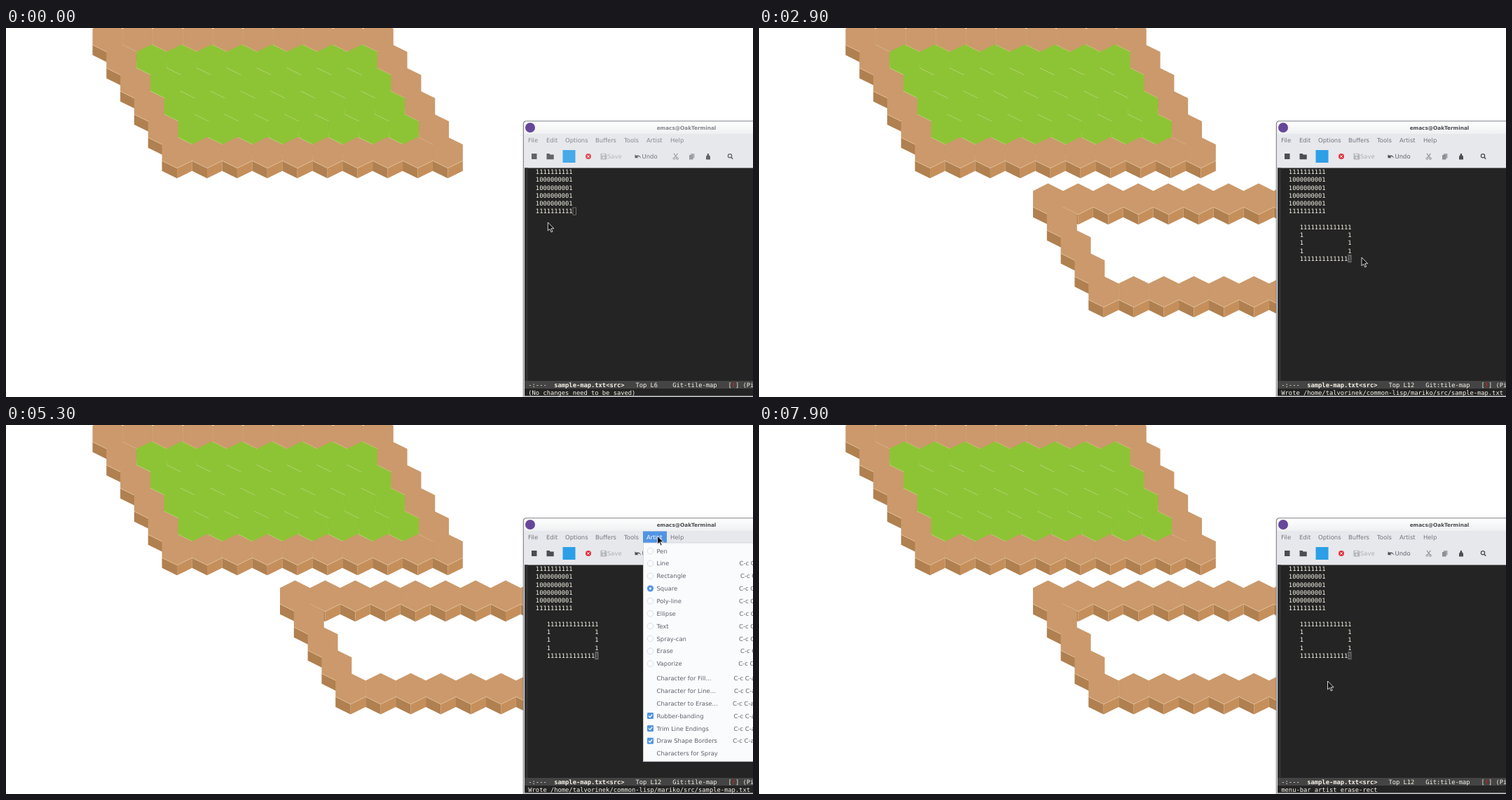
An HTML page that plays this animation: 1066x526 px, repeating every 8000 ms.

```html
<!DOCTYPE html>
<html lang="en">
<head>
<meta charset="utf-8">
<title>Tile map editing</title>
<style>
  html, body { margin: 0; width: 100%; height: 100%; overflow: hidden; background: #fff; }
  svg { display: block; width: 100vw; height: 100vh; }
  text { white-space: pre; text-rendering: geometricPrecision; }
  .ui { font: 8.45px "DejaVu Sans", sans-serif; fill: #5c616c; }
  .mono { font: 8.77px "DejaVu Sans Mono", monospace; fill: #f6f3e8; }
  .bold { font-weight: bold; }
  .title { font: bold 7.3px "DejaVu Sans", sans-serif; text-anchor: middle; }
</style>
</head>
<body>
<svg id="stage" viewBox="0 0 1066 526" preserveAspectRatio="none">
  <defs>
    <linearGradient id="bar" x2="0" y2="1">
      <stop stop-color="#fefefe"/><stop offset="1" stop-color="#eff0f2"/>
    </linearGradient>
  </defs>
  <g id="land"></g>
  <g id="newLand"></g>
  <g id="frame"></g>
  <g id="tools"></g>
  <g id="editor"></g>
  <g id="menu"></g>
  <path id="pointer" d="M0 0V12L2.8 9.4L4.8 14L6.7 13.2L4.7 8.8H8.6Z" fill="#111" stroke="#fff" stroke-width=".8"/>
</svg>
<script>
const LOOP = 8000, STEP = 100;
const CHAR = 5.28, LINE = 11.25, TEXT_X = 745.3;
const BLUE = '#5294e2', INK = '#4b4d52', FADED = '#b4b6bb';

const $ = id => document.getElementById(id);
const put = (id, html) => { if ($(id).lastHtml !== html) $(id).innerHTML = $(id).lastHtml = html; };
const esc = s => s.replace(/&/g, '&amp;').replace(/</g, '&lt;');
const rect = (x, y, w, h, fill, more = '') =>
  `<rect x="${x}" y="${y}" width="${w}" height="${h}" fill="${fill}" ${more}/>`;
const circle = (x, y, r, more) => `<circle cx="${x}" cy="${y}" r="${r}" ${more}/>`;
const path = (d, more) => `<path d="${d}" ${more}/>`;
const label = (x, y, s, cls = 'ui', more = '') =>
  `<text x="${x}" y="${y}" class="${cls}" ${more}>${esc(s)}</text>`;
const mono = (col, y, s, cls = '', more = '') => label(TEXT_X + col * CHAR, y, s, 'mono ' + cls, more);

// Map rows, as typed into the buffer
const ring = (w, h, fill) => Array.from({ length: h }, (_, r) =>
  r % (h - 1) && w > 1 ? '1' + fill.repeat(w - 2) + '1' : '1'.repeat(w));
const oldMap = ring(10, 6, '0');
const newMap = ring(14, 5, ' ');

// Hexagonal tile with two visible side faces; a joined tile laps under its right neighbour
const UNIT = .6605;
const W = 65 * UNIT, HALF = W / 2, CAP = 16 * UNIT, WALL = 35 * UNIT, DEPTH = 22 * UNIT;
const ROW_X = 30 * UNIT, ROW_Y = 50 * UNIT;
function tile(col, row, kind, joined) {
  const x = 123.5 + row * ROW_X + col * W, y = -9.6 + row * ROW_Y;
  const low = CAP + WALL, grass = kind === '0', lap = joined ? .4 : 0;
  const at = (d, fill) => path(`M${x} ${y}` + d, `fill="${fill}"`);
  return at(`m0 ${low}l${HALF} ${CAP}v${DEPTH}l${-HALF} ${-CAP}z`, '#b08050') +
    at(`m${W} ${low}l${-HALF} ${CAP}v${DEPTH}l${HALF} ${-CAP}z`, '#c58f5c') +
    at(`m0 ${CAP}l${HALF} ${-CAP}l${HALF} ${CAP}h${lap}v${WALL}h${-lap}l${-HALF} ${CAP}l${-HALF} ${-CAP}z`,
      grass ? '#8dc435' : '#cb996b') +
    path(`M${x} ${y + low}l${HALF} ${CAP}l${HALF} ${-CAP}`,
      `fill="none" stroke="${grass ? '#c6df98' : '#e3be97'}" stroke-width=".9"`);
}
const tiles = (rows, col0, row0) => rows.map((line, r) => [...line].map((kind, c) =>
  kind === ' ' ? '' : tile(col0 + c, row0 + r, kind, (line[c + 1] || ' ') !== ' ')).join('')).join('');

function drawFrame(active) {
  const bar = [[745, 'File'], [771, 'Edit'], [798, 'Options'], [841, 'Buffers'], [882, 'Tools'], [914, 'Artist'], [948, 'Help']];
  const tone = `opacity="${active ? .85 : .7}"`;
  return path('M738.3 526V137Q738.3 132.8 742.5 132.8H1067V526Z', 'fill="#e7e8eb" stroke="#7c7e82" stroke-width="1.1"') +
    path('M739.5 151V137Q739.5 133.5 743 133.5H1066V151Z', 'fill="url(#bar)"') +
    circle(748, 142, 7, 'fill="#67479a"') +
    label(971, 144.8, 'emacs@OakTerminal', 'title', `fill="${active ? '#4a4c50' : '#85878b'}"`) +
    bar.map(([x, s]) => label(x, 162.6, s, 'ui', tone)).join('');
}

function drawTools(active, dirty) {
  const save = dirty ? INK : FADED;
  const body =
    rect(750, 179, 7.5, 8, INK) +
    path('M771.5 179h4l1.2 1.5h5v6.8h-10.2z', `fill="${INK}"`) +
    rect(794.5, 174, 18, 18, '#2c9fe8') +
    circle(831, 183, 4, 'fill="#e0333f"') +
    path('M829.4 181.4l3.2 3.2m0-3.2l-3.2 3.2', 'stroke="#fff" stroke-width="1"') +
    path('M848.5 178.8h7l1.8 1.8v6.8h-8.8z', `fill="${save}"`) +
    rect(850.2, 179.6, 4.4, 2.2, '#e7e8eb') + circle(852.8, 184.8, 1.4, 'fill="#e7e8eb"') +
    label(858, 186.1, 'Save', 'ui', dirty ? '' : 'opacity=".42"') +
    path('M897.5 180.2v5h5l-1.8-1.8q3.2-1.6 5.6 2.6q-1.4-5.6-7.2-4.2z', `fill="${INK}"`) +
    label(907.6, 186.1, 'Undo') +
    path('M953 178.8l4.5 6m1-6l-4.5 6', 'stroke="#909298" stroke-width="1.1"') +
    circle(953.4, 186, 1.4, 'fill="none" stroke="#909298"') + circle(958, 186, 1.4, 'fill="none" stroke="#909298"') +
    rect(977, 179, 5.5, 6.5, '#a4a6ab') + rect(975, 181, 5.5, 6.5, '#8d8f95') +
    path('M1000.8 179h2.2v2q2 1 2 3v3.4h-6v-3.4q0-2 1.8-3z', `fill="${INK}"`) +
    circle(1033, 182.2, 2.6, `fill="none" stroke="${INK}" stroke-width="1.3"`) +
    path('M1035 184.2l2.2 2.5', `stroke="${INK}" stroke-width="1.5"`);
  return `<g opacity="${active ? 1 : .85}">${body}</g>`;
}

const lineY = row => 208.2 + row * LINE;

function drawEditor(s) {
  let out = rect(740, 199.5, 326, 325, '#242424') + rect(740, 199.5, 5, 303.5, '#303030');
  oldMap.forEach((line, r) => out += mono(2, lineY(r), line));
  s.drawn.forEach((line, r) => out += mono(5, lineY(7 + r), line));
  const { col, row, under, hollow } = s.caret;
  const x = TEXT_X + col * CHAR, y = lineY(row) - 8.8;
  if (hollow) out += rect(x + .3, y + .4, 4.6, 10.2, 'none', 'stroke="#8a8a88" stroke-width=".7"');
  else if (s.caretOn) out += rect(x, y, CHAR, 11.2, '#656565') + mono(col, lineY(row), under, '', 'style="fill:#242424"');

  const modeY = 511.6;
  out += rect(740, 503, 326, 11, '#444') +
    mono(0, modeY, s.dirty ? '-:**-' : '-:---') + mono(7, modeY, 'sample-map.txt<src>', 'bold') +
    mono(29, modeY, 'Top L' + s.line) + mono(39, modeY, s.saved ? 'Git:tile-map' : 'Git-tile-map') +
    mono(54, modeY, '[') + mono(55, modeY, '!', 'bold', 'style="fill:#f01414"') + mono(56, modeY, ']') +
    mono(58, modeY, '(Pic') + mono(0, 522.8, s.message);
  return out + rect(738, 525, 328, 1, '#c9cacc');
}

// [name, shortcut x]
const tools = [['Pen'], ['Line', 1046.5], ['Rectangle', 1048], ['Square', 1046], ['Poly-line', 1046], ['Ellipse', 1046.5],
  ['Text', 1046], ['Spray-can', 1046], ['Erase', 1048], ['Vaporize', 1045.3]];
const options = [['Character for Fill...', 1038.5], ['Character for Line...', 1039], ['Character to Erase...', 1037],
  ['Rubber-banding', 1038.5], ['Trim Line Endings', 1038.5], ['Draw Shape Borders', 1037.3], ['Characters for Spray']];
const ITEM = 17.85, MENU_Y = 170.6;

function drawMenu(pointerY) {
  const hover = Math.floor((pointerY - MENU_Y) / ITEM);
  let out = rect(909, 151.5, 34, 16.5, BLUE) + label(914, 162.6, 'Artist', 'ui', 'style="fill:#fff"') +
    rect(909.5, 168, 160, 311.7, '#fafbfc', 'stroke="#cfd3da" stroke-width=".8"');
  const row = ([name, keyX], mid, lit) => {
    const ink = lit ? 'style="fill:#fff"' : '';
    return (lit ? rect(909.5, mid - 8.9, 157, ITEM, BLUE) : '') + label(928.5, mid + 3.1, name, 'ui', ink) +
      (keyX ? label(keyX, mid + 3.1, 'C-c C-a', 'ui', ink) : '');
  };
  tools.forEach((item, i) => {
    const mid = MENU_Y + (i + .5) * ITEM;
    out += row(item, mid, i === hover);
    out += item[0] === 'Square'
      ? circle(919.5, mid, 4.6, `fill="${BLUE}"`) + circle(919.5, mid, 1.6, 'fill="#fff"')
      : circle(919.5, mid, 4.3, 'fill="none" stroke="#cfd6e6" stroke-width=".8"');
  });
  options.forEach((item, i) => {
    const mid = 361 + i * ITEM;
    out += row(item, mid, false);
    if (i > 2 && i < 6) out += rect(915, mid - 4.5, 9, 9, BLUE, 'rx="1.2"') +
      path(`M917 ${mid}l2 2l3.2-4`, 'fill="none" stroke="#fff" stroke-width="1.3"');
  });
  return out;
}

// Pointer keys: time, x, y
const track = [[0, 773.3, 277], [200, 773, 283.5], [1100, 773, 283.5], [2300, 846, 322], [2400, 860, 327],
  [3400, 860, 327], [3500, 864, 315], [3900, 923, 143], [4100, 929.5, 158], [5800, 929.5, 158],
  [5900, 930, 163], [6400, 940, 267], [6700, 946, 290], [7000, 946, 292], [7300, 948, 325],
  [7700, 948, 325], [7800, 930, 332], [7900, 811.5, 365]];

function pointerAt(t) {
  const i = track.findIndex(k => k[0] > t);
  if (i < 0) return track[track.length - 1].slice(1);
  const a = track[i - 1], b = track[i], f = (t - a[0]) / (b[0] - a[0]);
  return [1, 2].map(n => a[n] + (b[n] - a[n]) * f);
}

function stateAt(t) {
  const width = t < 1100 ? 0 : t < 1300 ? 1 : Math.min(14, 2 * (Math.floor((t - 1300) / STEP) + 1));
  const height = width && Math.max(1, Math.round(width * 5 / 14));
  const saved = t >= 2800;
  return {
    saved,
    dirty: t >= 900 && !saved,
    line: width ? 7 + height : 6,
    drawn: !width ? [] : height < 2 ? ['1'.repeat(width)] : ring(width, height, ' '),
    caret: width ? { col: 4 + width, row: 6 + height, under: '1' } : { col: 12, row: 5, under: ' ', hollow: t < 900 },
    caretOn: !(t >= 3500 && t < 5000 && Math.floor(t / 500) % 2),
    message: t < 900 ? '(No changes need to be saved)' : !saved ? '' :
      t < 7800 ? 'Wrote /home/talvorinek/common-lisp/mariko/src/sample-map.txt' : 'menu-bar artist erase-rect'
  };
}

function render(time) {
  const t = Math.floor((time % LOOP) / STEP) * STEP;
  const s = stateAt(t), active = t >= 900, [x, y] = pointerAt(t);
  put('frame', drawFrame(active));
  put('tools', drawTools(active, s.dirty));
  put('editor', drawEditor(s));
  put('menu', t >= 5300 && t < 7800 ? drawMenu(y) : '');
  $('newLand').style.display = t >= 2900 ? '' : 'none';
  $('pointer').style.display = t >= 1100 && t < 2300 ? 'none' : '';
  $('pointer').setAttribute('transform', `translate(${x} ${y})`);
}

put('land', tiles(oldMap, 0, 0));
put('newLand', tiles(newMap, 3, 7));
const start = performance.now();
function tick() {
  render(performance.now() - start);
  requestAnimationFrame(tick);
}
tick();
</script>
</body>
</html>
```
